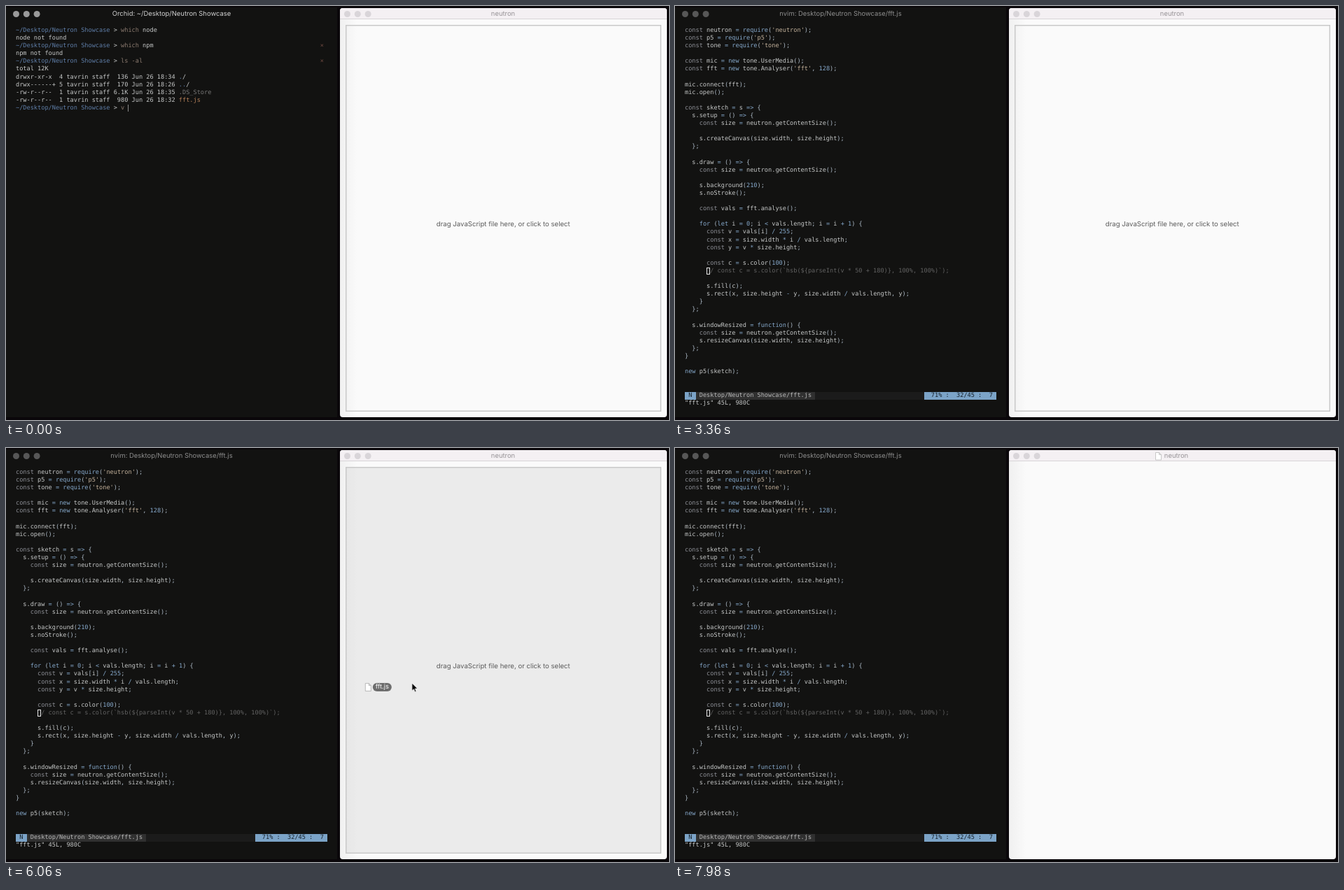
Animation of 947 by 592 pixels, one loop 8 s. Source, as an HTML page:

```html
<!DOCTYPE html>
<html lang="en">
<head>
<meta charset="utf-8">
<title>Terminal and drop window</title>
<style>
  html, body { margin: 0; width: 100%; height: 100%; overflow: hidden; background: #0a070a; }
  body { position: relative; font-family: Inter, "Open Sans", sans-serif; text-rendering: geometricPrecision; }
  body *, svg { position: absolute; }
  pre, pre * { font: 8.605px/11.1px "DejaVu Sans Mono", monospace; }
  pre { margin: 0; left: 14px; top: 30px; color: #c6c8c8; white-space: pre; }
  pre span { position: static; }

  #term { left: 0; top: 2px; width: 473px; height: 586px; background: #121211; }
  #win { left: 477px; top: 3px; width: 467px; height: 585px; border-radius: 4px; overflow: hidden;
         background: linear-gradient(90deg, #f0f0f0, #fafafa 24px); }
  #bar { width: 100%; height: 15px; background: #f4f0f3; border-bottom: 1px solid #d8d5d8; }
  .title { top: 4px; height: 15px; line-height: 15px; font-size: 9.45px; white-space: nowrap; transform: translateX(-50%); }
  .left { left: 236.5px; color: #d2d2d2; }
  .right { left: 710px; color: #969296; }
  .lights { top: 6.5px; width: 9px; height: 9px; border-radius: 50%; background: currentColor;
            box-shadow: 14.8px 0 currentColor, 29.6px 0 currentColor; }

  .path { color: #5f7ea8; } .cmd { color: #8c7b70; } .dim { color: #777; }
  .file { color: #b37f59; } .err { color: #6e4a40; }
  .kw { color: #8d8f96; } .op { color: #86a9cc; } .str { color: #c4b29c; }
  .br { color: #adbac7; } .note { color: #626262; }
  pre .typed { display: inline-block; vertical-align: top; overflow: hidden; width: 6ch; height: 11.1px;
               animation: type 8s infinite; }
  pre .caret { border-left: 1px solid #8a8a8a; }
  #status { top: 551.7px; }
  #status span { display: inline-block; height: 11.1px; }
  .mode { background: #7ba3c7; color: #16202a; }
  .name { background: #303030; color: #b9b9b9; }
  .fill { background: #1b1b1b; }
  #message { top: 562.8px; }
  #block { left: 107px; top: 563px; width: 5.2px; height: 10px; background: #b8b8bc; }
  #cell { left: 45px; top: 374px; width: 5.2px; height: 10px; background: #fff; color: #111;
          font: 8.605px/10.4px "DejaVu Sans Mono", monospace; }
  #hollow { left: 45px; top: 374px; width: 3.4px; height: 8px; border: 1px solid #e8e8e8; background: #121211; }

  #zone { left: 485px; top: 26.6px; width: 451px; height: 553.4px; box-shadow: inset 0 0 0 1.5px #c9c9c9; }
  #hint { left: 710.3px; top: 305px; font-size: 9.6px; line-height: 15px; color: #5c5c5c; white-space: nowrap; transform: translateX(-50%); }
  #pointer { left: 0; top: 0; width: 10px; height: 15px; }
  #drag { left: -67px; top: 0; width: 40px; height: 14px; }
  #label { left: 11px; top: 0; width: 27px; height: 12px; border-radius: 6px; background: #6d6d6d; color: #fff;
           font-size: 9.3px; line-height: 12.5px; text-align: center; }
  svg { overflow: visible; left: 0; top: 0; width: 10px; height: 14px; }

  .step { animation: 8s step-end infinite; }
  #shell { animation-name: shell; }
  #t1 { animation-name: t1; } #t2 { animation-name: t2; }
  #message { animation-name: message; } #block { animation-name: block; }
  #editor, #t3 { animation-name: editor; }
  #t3 span { position: static; animation-name: blurTitle; }
  #lamps { color: #9a9a9a; animation-name: blurLamps; }
  #cell { animation-name: cell; } #hollow { animation-name: hollow; }
  #drop { animation-name: drop; } #r1 { animation-name: r1; } #r2 { animation-name: r2; }
  #pointer { animation: move 8s infinite; }
  #seen { animation-name: seen; } #drag { animation-name: drag; }
  #zone { animation: hover 8s infinite; }

  @keyframes type {
    0%, .75% { width: 0; animation-timing-function: steps(6, jump-start); }
    7.05%, 100% { width: 6ch; }
  }
  @keyframes shell { 0% { visibility: visible } 12%, 100% { visibility: hidden } }
  @keyframes t1 { 0% { visibility: visible } 10.5%, 100% { visibility: hidden } }
  @keyframes t2 { 0% { visibility: hidden } 10.5% { visibility: visible } 22.5%, 100% { visibility: hidden } }
  @keyframes message { 0% { visibility: hidden } 21.7%, 100% { visibility: visible } }
  @keyframes block { 0% { visibility: hidden } 21.7% { visibility: visible } 22.5%, 100% { visibility: hidden } }
  @keyframes editor { 0% { visibility: hidden } 22.5%, 100% { visibility: visible } }
  @keyframes cell { 0% { visibility: hidden } 22.5% { visibility: visible } 30.75%, 100% { visibility: hidden } }
  @keyframes hollow { 0% { visibility: hidden } 30.75%, 100% { visibility: visible } }
  @keyframes blurTitle { 0% { color: #c8c8c8 } 30.75%, 100% { color: #8e8e8e } }
  @keyframes blurLamps { 0% { color: #9a9a9a } 29.25% { color: #6c6c6c } 32.5%, 100% { color: #575757 } }
  @keyframes drop { 0% { visibility: visible } 91.5%, 100% { visibility: hidden } }
  @keyframes r1 { 0% { visibility: visible } 96.75%, 100% { visibility: hidden } }
  @keyframes r2 { 0% { visibility: hidden } 96.75%, 100% { visibility: visible } }
  @keyframes seen { 0% { visibility: hidden } 73.6% { visibility: visible } 91.5%, 100% { visibility: hidden } }
  @keyframes drag { 0% { opacity: 1 } 82.5%, 100% { opacity: 0 } }
  @keyframes move {
    0%, 73.5% { transform: translate(470px, 600px); animation-timing-function: linear; }
    75% { transform: translate(560.5px, 376px); animation-timing-function: ease-out; }
    79.5%, 100% { transform: translate(633.5px, 225px); }
  }
  @keyframes hover {
    0%, 75% { background: #d4d4d400; }
    78%, 100% { background: #d4d4d4; }
  }
</style>
</head>
<body>
<div id="term"></div>
<div class="lights step" id="lamps" style="left:9.5px"></div>
<div class="title left step" id="t1">Orchid: ~/Desktop/Neutron Showcase</div>
<div class="title left step" id="t2">Orchid: v fft.js</div>
<div class="title left step" id="t3"><span class="step">nvim: Desktop/Neutron Showcase/fft.js</span></div>

<pre id="shell" class="step"><span class="path">~/Desktop/Neutron Showcase</span> &gt; <span class="cmd">which</span> node
node not found
<span class="path">~/Desktop/Neutron Showcase</span> &gt; <span class="cmd">which</span> npm                                              <span class="err">×</span>
npm not found
<span class="path">~/Desktop/Neutron Showcase</span> &gt; <span class="cmd">ls -al</span>                                                 <span class="err">×</span>
total 12K
drwxr-xr-x  4 tavrin staff  136 Jun 26 18:34 <span class="path">.</span>/
drwx------+ 5 tavrin staff  170 Jun 26 18:26 <span class="path">..</span>/
-rw-r--r--  1 tavrin staff 6.1K Jun 26 18:35 <span class="dim">.DS_Store</span>
-rw-r--r--  1 tavrin staff  980 Jun 26 18:32 <span class="file">fft.js</span>
<span class="path">~/Desktop/Neutron Showcase</span> &gt; <span class="cmd">v</span> <span class="typed">fft.js</span><span class="caret"></span></pre>

<div id="editor" class="step">
<pre id="code">const neutron = require('neutron');
const p5 = require('p5');
const tone = require('tone');

const mic = new tone.UserMedia();
const fft = new tone.Analyser('fft', 128);

mic.connect(fft);
mic.open();

const sketch = s =&gt; {
  s.setup = () =&gt; {
    const size = neutron.getContentSize();

    s.createCanvas(size.width, size.height);
  };

  s.draw = () =&gt; {
    const size = neutron.getContentSize();

    s.background(210);
    s.noStroke();

    const vals = fft.analyse();

    for (let i = 0; i &lt; vals.length; i = i + 1) {
      const v = vals[i] / 255;
      const x = size.width * i / vals.length;
      const y = v * size.height;

      const c = s.color(100);
      // const c = s.color(`hsb(${parseInt(v * 50 + 180)}, 100%, 100%)`);

      s.fill(c);
      s.rect(x, size.height - y, size.width / vals.length, y);
    }
  };

  s.windowResized = function() {
    const size = neutron.getContentSize();
    s.resizeCanvas(size.width, size.height);
  };
}

new p5(sketch);</pre>
<pre id="status"><span class="mode"> N </span><span class="name"> Desktop/Neutron Showcase/fft.js </span><span class="fill">                              </span><span class="mode">  71% :  32/45 :  7 </span></pre>
</div>
<pre id="message" class="step">"fft.js" 45L, 980C</pre>
<div id="block" class="step"></div>
<div id="cell" class="step">/</div>
<div id="hollow" class="step"></div>

<div id="win"><div id="bar"></div></div>
<div class="lights" style="left:483px;color:#d9d5d9"></div>
<div class="title right step" id="r1">neutron</div>
<div class="step" id="r2">
  <svg style="left:686px;top:6px"><path d="M.5.5H5.5L8.5 3.5V11H.5ZM5.5.5V3.5H8.5" fill="#fff" stroke="#bbb" stroke-width=".8"/></svg>
  <div class="title right" style="left:716px">neutron</div>
</div>

<div id="drop" class="step">
  <div id="zone"></div>
  <div id="hint">drag JavaScript file here, or click to select</div>
</div>
<div id="pointer"><div id="seen" class="step">
  <div id="drag" class="step">
    <svg><path d="M.5.5H5.5L8.5 3.5V11.5H.5ZM5.5.5V3.5H8.5" fill="#fff" stroke="#aaa" stroke-width=".8"/></svg>
    <div id="label">fft.js</div>
  </div>
  <svg><path d="M0 0V11.2L2.6 8.8 4.3 12.8 6.2 12 4.5 8.1H8Z" fill="#000" stroke="#fff" stroke-width=".8"/></svg>
</div></div>

<script>
  const styles = ['note', 'str', 'kw', 'op', 'br'];
  const tokens = /(\/\/.*)|('[^']*')|(\bconst\b)|(\b(?:require|new|for|let|function|\d+)\b|[=<>+*\/-]+)|([(){}\[\];,]+)/g;
  const escapeText = s => s.replace(/</g, '&lt;').replace(/>/g, '&gt;');
  const code = document.getElementById('code');
  code.innerHTML = code.textContent.replace(tokens, (text, ...groups) => {
    const kind = styles[groups.slice(0, 5).findIndex(Boolean)];
    return `<span class="${kind}">${escapeText(text)}</span>`;
  });
</script>
</body>
</html>
```
